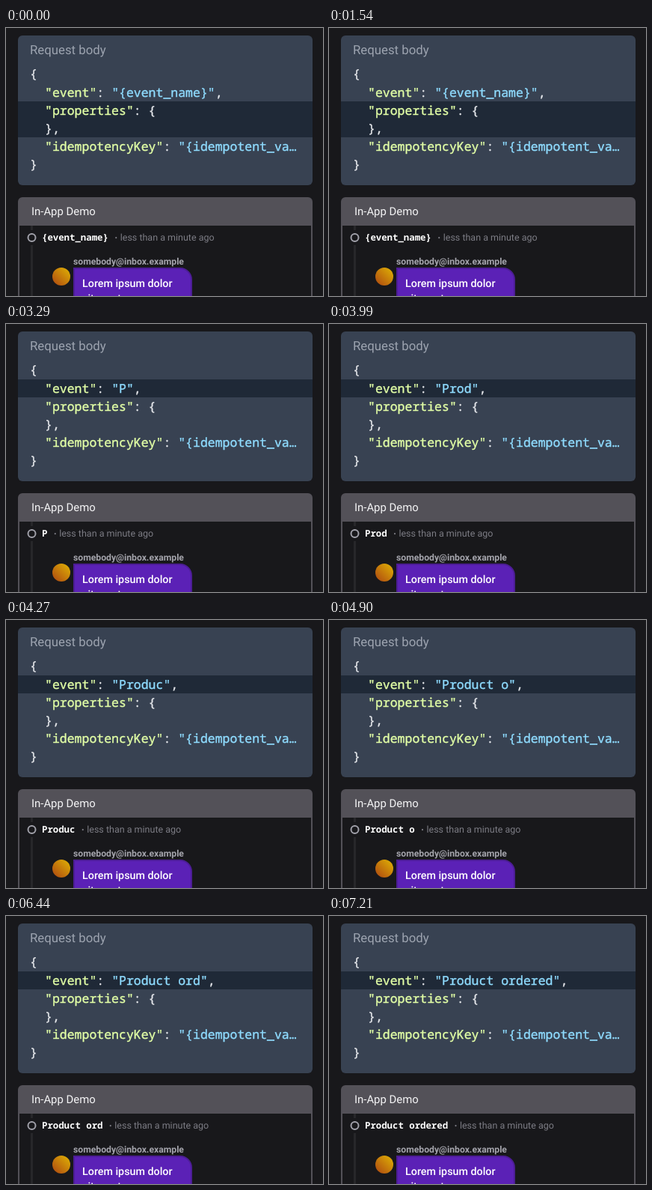
These frames come from a looping animation (424x358 px, 8000 ms). An HTML page:

```html
<!DOCTYPE html>
<html lang="en">
<head>
<meta charset="utf-8">
<title>Event request demo</title>
<style>
html, body { margin: 0; width: 100%; height: 100%; overflow: hidden; background: #18181b; }
svg { display: block; }
text { white-space: pre; text-rendering: geometricPrecision; font-family: Roboto, sans-serif; }
.code { color: #e5e7eb; }
.code text, .code tspan { fill: currentColor; stroke: currentColor; stroke-width: .35px; }
.code text { font: 16.5px "Noto Sans Mono", monospace; }
.code .key { color: #e2ffa6; }
.code .val { color: #8fdcff; }
#name { font: bold 12.35px "Noto Sans Mono", monospace; fill: #fff; }
</style>
</head>
<body>
<svg width="424" height="358" viewBox="0 0 424 358">
  <defs>
    <linearGradient id="sun" x1=".85" y1=".15" x2=".15" y2=".85">
      <stop offset="0" stop-color="#d9a406"/><stop offset="1" stop-color="#b4560f"/>
    </linearGradient>
  </defs>

  <rect x="16" y="10" width="394" height="200" rx="6" fill="#384252"/>
  <rect id="mark" x="16" width="394" fill="#1f2937"/>
  <text x="32" y="35" font-size="16.8" fill="#9ca3af">Request body</text>
  <g class="code">
    <text x="32" y="67">{</text>
    <text x="52" y="91.5"><tspan class="key">"event"</tspan>: <tspan class="val" id="value"></tspan>,</text>
    <text x="52" y="115.5"><tspan class="key">"properties"</tspan>: {</text>
    <text x="52" y="139.5">},</text>
    <text x="52" y="163.5"><tspan class="key">"idempotencyKey"</tspan>: <tspan class="val">"{idempotent_va…</tspan></text>
    <text x="32" y="187.5">}</text>
  </g>

  <path d="M16 358V232a6 6 0 0 1 6-6H404a6 6 0 0 1 6 6V358h-2V264H18V358z" fill="#535158"/>
  <text x="34" y="250" font-size="14.9" fill="#f4f4f5">In-App Demo</text>
  <path d="M34.5 264v6M34.5 290v68" stroke="#27272a" stroke-width="3"/>
  <circle cx="34.5" cy="280" r="5" fill="none" stroke="#a1a1aa" stroke-width="2"/>
  <text id="name" x="48" y="284"></text>
  <text id="ago" y="284" font-size="12.5" fill="#7c7c84"><tspan font-size="10.5">•</tspan><tspan id="when">less than a minute ago</tspan></text>

  <text x="90" y="316" font-size="12.2" font-weight="bold" fill="#a4a4ac">somebody@inbox.example</text>
  <circle cx="74" cy="332" r="12" fill="url(#sun)"/>
  <path d="M91 360V321H233a15 15 0 0 1 15 15V360" fill="#5b21b6" stroke="#4c1d95" stroke-width="2"/>
  <g font-size="14.3" font-weight="500" fill="#fff">
    <text x="102" y="346">Lorem ipsum dolor</text>
    <text x="102" y="366">sit amet</text>
  </g>
</svg>
<script>
const LOOP = 8000, FOCUS = 2240, PITCH = 7.41;
const PHRASE = "Product ordered";
// [time, letters of the phrase typed so far]
const TYPING = [
  [3290, 1], [3360, 2], [3500, 3], [3990, 4], [4130, 5], [4270, 6], [4480, 7],
  [4620, 8], [4900, 9], [5110, 10], [5390, 11], [5950, 10], [6090, 9],
  [6230, 10], [6440, 11], [6650, 12], [6860, 13], [7070, 14], [7210, 15]
];
const el = id => document.getElementById(id);
const start = performance.now();

function draw(t) {
  const step = TYPING.findLast(([at]) => t >= at);
  const event = step ? PHRASE.slice(0, step[1]) : "{event_name}";
  const shown = event.trimEnd();
  const end = 48 + shown.length * PITCH;
  el("value").textContent = `"${event}"`;
  el("name").textContent = shown;
  el("ago").setAttribute("x", end + 8.5);
  el("when").setAttribute("x", end + 15.8);
  el("mark").setAttribute("y", t < FOCUS ? 98 : 74);
  el("mark").setAttribute("height", t < FOCUS ? 48 : 24);
}

function tick(now) {
  draw(Math.max(0, now - start) % LOOP);
  requestAnimationFrame(tick);
}
draw(0);
requestAnimationFrame(tick);
</script>
</body>
</html>
```
